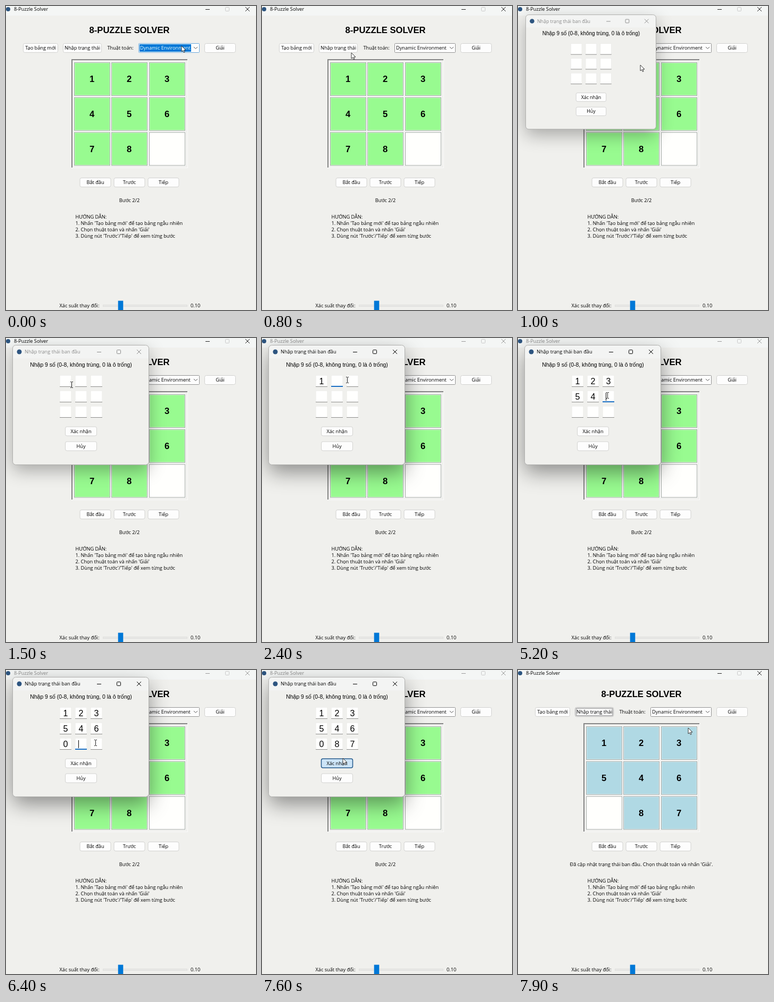
Recreate the animation shown at these times as an HTML page with a canvas. Size 470 by 572 pixels, loop 8 s.

```html
<!DOCTYPE html>
<html lang="vi">
<head>
<meta charset="utf-8">
<style>
  html, body { margin: 0; width: 100%; height: 100%; overflow: hidden; background: #f0f0ed; }
  canvas { display: block; }
</style>
</head>
<body>
<canvas id="stage" width="470" height="572"></canvas>
<script>
const ctx = document.getElementById('stage').getContext('2d');
const LOOP = 8000, STEP = 100;
const UI = '"Open Sans", "Noto Sans", sans-serif';
const ARIAL = '"Liberation Sans", Arial, sans-serif';
const BG = '#f0f0ed', BLUE = '#0078d7', INK = '#000', FADED = '#8a8a8a';

// Moments of the story, in ms
const CLICK = 600, OPEN = 900, FOCUS = 1600, CONFIRM = 7500, PRESS = 7600, CLOSE = 7800, GONE = 7900;

// Each row of fields is filled left to right at a steady pace
const ENTERED = '123546087';
const FIELD_GAP = 700, POINTER_LEAD = 500, TRAVEL = 300;
const rows = [
  { start: FOCUS, delay: 300 },
  { start: 3300, delay: 600 },
  { start: 5500, delay: 300 }
];
const fields = [...ENTERED].map((digit, i) => {
  const col = i % 3, row = Math.floor(i / 3), { start, delay } = rows[row];
  const focus = start + col * FIELD_GAP;
  return {
    digit, focus, typed: focus + delay,
    reached: start + Math.max(0, col * FIELD_GAP - POINTER_LEAD),
    x: 101 + col * 29, y: 70 + row * 29
  };
});

const stops = [
  { t: 0, x: 330, y: 75 },
  { t: 500, x: 146, y: 80 },
  { t: 700, x: 146, y: 80 },
  { t: 1000, x: 230, y: 111 },
  { t: 1500, x: 123, y: 88 },
  ...fields.map(f => ({ t: f.reached, x: f.x + 9, y: f.y + 9 })),
  { t: CONFIRM, x: 152, y: 166 },
  { t: GONE, x: 320, y: 109 }
];

const clamp = v => Math.min(1, Math.max(0, v));
const smooth = u => u * u * (3 - 2 * u);

function text(str, x, y, { size = 9.2, font = UI, weight = 400, color = INK, align = 'left' } = {}) {
  ctx.font = `${weight} ${size}px ${font}`;
  ctx.textAlign = align;
  ctx.fillStyle = color;
  ctx.fillText(str, x, y + size * 0.36);
}

function rect(x, y, w, h, color) {
  ctx.fillStyle = color;
  ctx.fillRect(x, y, w, h);
}

function frame(x, y, w, h, color) {
  ctx.strokeStyle = color;
  ctx.lineWidth = 1;
  ctx.strokeRect(x + 0.5, y + 0.5, w - 1, h - 1);
}

function rounded(x, y, w, h, radius, fill, border, width = 1) {
  ctx.beginPath();
  ctx.roundRect(x + 0.5, y + 0.5, w - 1, h - 1, radius);
  if (fill) {
    ctx.fillStyle = fill;
    ctx.fill();
  }
  if (border) {
    ctx.strokeStyle = border;
    ctx.lineWidth = width;
    ctx.stroke();
  }
}

function line(color, ...points) {
  ctx.beginPath();
  points.forEach(([x, y]) => ctx.lineTo(x, y));
  ctx.strokeStyle = color;
  ctx.lineWidth = 1;
  ctx.stroke();
}

function dot(x, y, r, color) {
  ctx.fillStyle = color;
  ctx.beginPath();
  ctx.arc(x, y, r, 0, Math.PI * 2);
  ctx.fill();
}

const buttonLooks = {
  normal: ['#fdfdfd', '#d2d2d0'],
  hover: ['#e0eef9', BLUE],
  pressed: ['#cce4f7', '#245a8c'],
  focused: ['#fdfdfd', '#a8a8a8']
};

function button(label, x, y, w, state = 'normal') {
  const h = 18, [fill, border] = buttonLooks[state];
  rounded(x, y, w, h, 3, fill, border, state === 'pressed' ? 1.5 : 1);
  if (state === 'focused') frame(x + 2, y + 2, w - 4, h - 4, '#8c8c8c');
  text(label, x + w / 2, y + h / 2, { align: 'center' });
}

function windowControls(min, y, color, maxColor) {
  const r = 4, max = min + 37, close = min + 75;
  line(color, [min - r, y + 0.5], [min + r, y + 0.5]);
  rounded(max - r, y - r, r * 2, r * 2, 1, null, maxColor);
  line(color, [close - r, y - r], [close + r, y + r]);
  line(color, [close + r, y - r], [close - r, y + r]);
}

function board(cells, color) {
  rect(123, 100, 219, 205, '#fafafa');
  rect(123, 100, 218, 204, '#858585');
  rect(125, 102, 216, 202, BG);
  [...cells].forEach((digit, i) => {
    const x = 128 + Math.floor((i % 3) * 70.7), y = 106 + Math.floor(i / 3) * 65.7;
    rect(x - 1, y - 1, 70, 65, '#fafafa');
    rect(x, y, 68, 63, '#a2a8a4');
    rect(x + 1, y + 1, 66, 61, digit === '0' ? '#fffffd' : color);
    if (digit === '0') return;
    frame(x + 1, y + 1, 66, 61, 'rgba(255,255,255,0.35)');
    text(digit, x + 33.5, y + 31.5, { size: 16.6, font: ARIAL, weight: 700, align: 'center' });
  });
}

function combo(selected) {
  rounded(249, 70, 115, 18, 1, '#fdfdfd', selected ? '#6aa7da' : '#949494');
  if (selected) rect(251, 72, 97, 14, BLUE);
  text('Dynamic Environment', 252, 78.5, { color: selected ? '#fff' : INK });
  line('#555', [353, 77], [356.5, 80.5], [360, 77]);
}

function stateButtonLook(t) {
  if (t >= CLOSE) return 'focused';
  if (t === CLICK) return 'pressed';
  return Math.abs(t - CLICK) <= STEP ? 'hover' : 'normal';
}

function mainWindow(t) {
  const active = t < FOCUS || t >= CLOSE;
  const solved = t < CLOSE;
  rect(0, 0, 470, 572, BG);
  rect(0, 0, 470, 18, '#f4f6f5');
  dot(4, 6, 4, '#2d5580');
  text('8-Puzzle Solver', 15, 6, { color: active ? INK : FADED });
  windowControls(379, 6, active ? '#222' : '#999', '#c9c9c9');

  text('8-PUZZLE SOLVER', 232, 45, { size: 16.6, font: ARIAL, weight: 700, align: 'center' });
  button('Tạo bảng mới', 32, 70, 66);
  button('Nhập trạng thái', 107, 70, 73, stateButtonLook(t));
  text('Thuật toán:', 190.5, 78.5);
  combo(t < CLICK);
  button('Giải', 373, 70, 59);

  if (solved) board('123456780', '#98fb90');
  else board(ENTERED, '#b0d9e4');

  ['Bắt đầu', 'Trước', 'Tiếp'].forEach((label, i) => button(label, 138.5 + i * 64, 323, 59));
  text(solved ? 'Bước 2/2' : "Đã cập nhật trạng thái ban đầu. Chọn thuật toán và nhấn 'Giải'.",
    232, 365.5, { align: 'center' });
  ['HƯỚNG DẪN:',
    "1. Nhấn 'Tạo bảng mới' để tạo bảng ngẫu nhiên",
    "2. Chọn thuật toán và nhấn 'Giải'",
    "3. Dùng nút 'Trước'/'Tiếp' để xem từng bước"
  ].forEach((row, i) => text(row, 130.5, 397 + i * 12));

  text('Xác suất thay đổi:', 100.5, 564);
  rect(182, 562, 159, 4, '#dededc');
  rect(183, 563, 157, 2, '#e9e9e7');
  rect(210.7, 554.6, 9.6, 18, BLUE);
  text('0.10', 347, 564);
}

function entry({ digit, focus, typed, x, y }, i, t) {
  const end = fields[i + 1]?.focus ?? PRESS;
  const focused = t >= focus && t < end;
  rect(x, y, 22, 22, '#e4e4e2');
  rect(x + 0.5, y + 0.5, 21, 21, '#fffffe');
  if (focused) rect(x, y + 20, 22, 2, '#1a6fc4');
  else rect(x, y + 21, 22, 1, '#8c8c8a');
  if (t >= typed) {
    text(digit, x + 11, y + 11.5, { size: 16, font: ARIAL, align: 'center' });
  } else if (focused && t >= typed - STEP) {
    rect(x + 6, y + 4, 1, 15, INK);
  }
}

function dialogPose(t) {
  if (t < OPEN || t >= GONE) return null;
  if (t >= CLOSE) return { scale: 0.94, alpha: 0.4 };
  const left = clamp(1 - (t - OPEN) / 300);
  return { scale: 1 - 0.145 * left ** 3, alpha: t === OPEN ? 0.6 : 1 };
}

function dialog(t) {
  const pose = dialogPose(t);
  if (!pose) return;
  const active = t >= FOCUS;
  const ink = active ? INK : FADED;
  const { scale, alpha } = pose;
  ctx.save();
  ctx.globalAlpha = alpha;
  ctx.translate(58 * (1 - scale), 83 * (1 - scale));
  ctx.scale(scale, scale);

  ctx.save();
  ctx.shadowColor = `rgba(0,0,0,${active ? 0.42 : 0.3})`;
  ctx.shadowBlur = active ? 38 : 32;
  ctx.shadowOffsetY = active ? 14 : 11;
  rounded(12, 13, 257, 226, 6, BG);
  ctx.restore();
  rounded(12, 13, 257, 26, [6, 6, 0, 0], '#f3f4f3');
  rounded(12, 13, 257, 226, 6, null, '#aeaeac');

  dot(25, 26, 4.5, '#2d5580');
  text('Nhập trạng thái ban đầu', 35, 26, { color: ink });
  windowControls(175, 26, ink, ink);
  text('Nhập 9 số (0-8, không trùng, 0 là ô trống)', 141, 50.5,
    { size: 10.45, font: ARIAL, align: 'center' });
  fields.forEach((field, i) => entry(field, i, t));
  button('Xác nhận', 111, 166.5, 60, t >= PRESS ? 'pressed' : t >= CONFIRM ? 'hover' : 'normal');
  button('Hủy', 111, 194.5, 60);
  ctx.restore();
}

function pointerAt(t) {
  const next = stops.findIndex(stop => stop.t > t);
  if (next < 0) return stops.at(-1);
  const from = stops[next - 1], to = stops[next];
  const leave = Math.max(from.t, to.t - TRAVEL);
  const k = smooth(clamp((t - leave) / (to.t - leave)));
  return { x: from.x + (to.x - from.x) * k, y: from.y + (to.y - from.y) * k };
}

function beam() {
  rect(0, -5, 1, 10, '#222');
  for (const end of [-6, 5]) {
    rect(-2, end, 2, 1, '#222');
    rect(1, end, 2, 1, '#222');
  }
}

function arrow() {
  ctx.beginPath();
  [[0, 0], [0, 11], [2.6, 8.7], [4.3, 12.6], [6.1, 11.8], [4.4, 8], [8, 8]]
    .forEach(([x, y]) => ctx.lineTo(x, y));
  ctx.closePath();
  ctx.fillStyle = '#fff';
  ctx.fill();
  ctx.strokeStyle = '#222';
  ctx.lineWidth = 0.9;
  ctx.stroke();
}

function pointer(t) {
  const { x, y } = pointerAt(t);
  const overEntry = t > OPEN + STEP && t < CLOSE &&
    fields.some(f => x >= f.x && x <= f.x + 22 && y >= f.y && y <= f.y + 22);
  ctx.save();
  ctx.translate(Math.round(x), Math.round(y));
  if (overEntry) beam();
  else arrow();
  ctx.restore();
}

function draw(now) {
  const t = Math.floor((now % LOOP) / STEP) * STEP;
  mainWindow(t);
  dialog(t);
  pointer(t);
}

let start;
function tick(now) {
  start ??= now;
  draw(now - start);
  requestAnimationFrame(tick);
}
draw(0);
requestAnimationFrame(tick);
</script>
</body>
</html>
```
